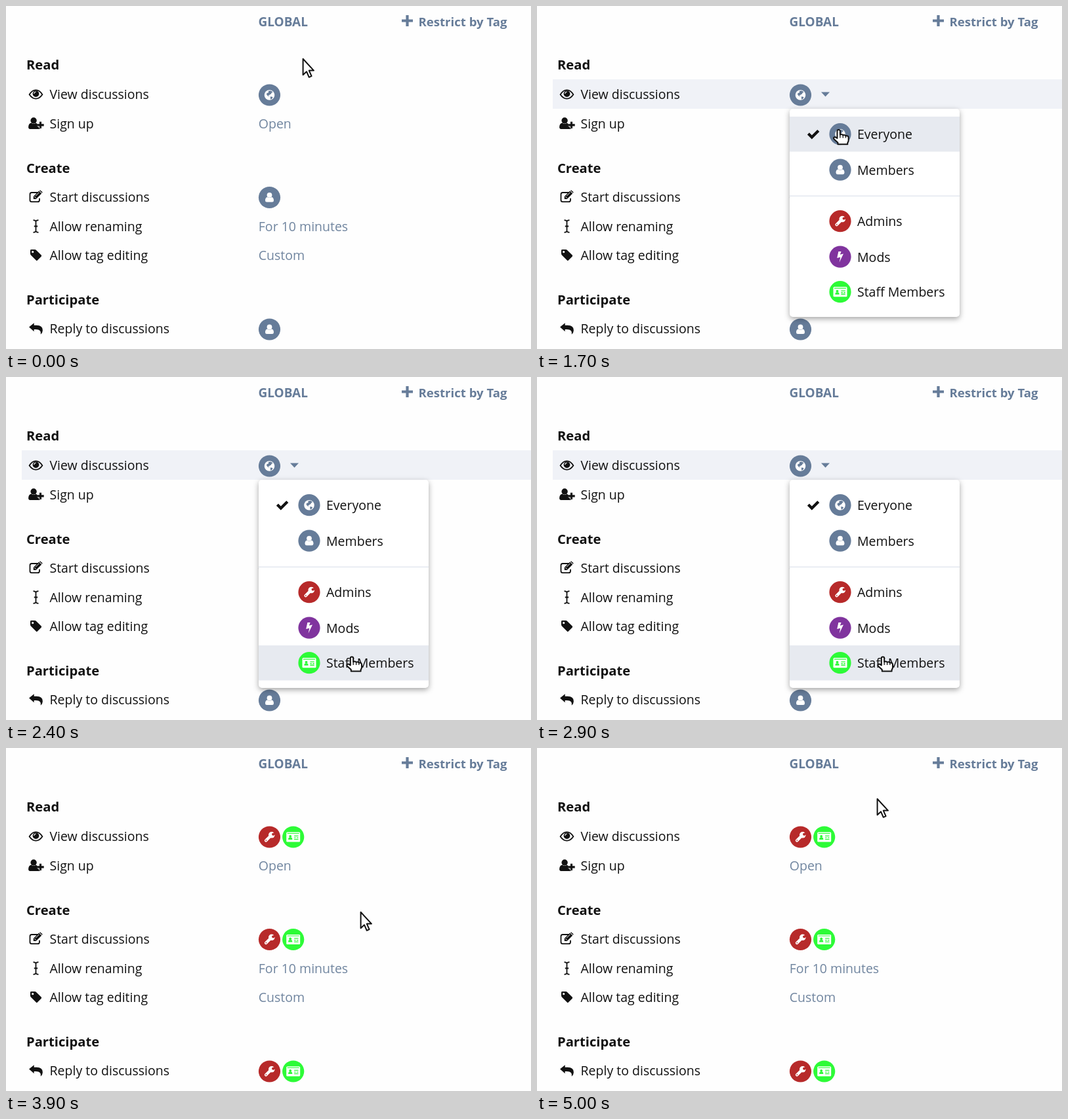
These frames come from a looping animation (800x524 px, 5.1 s). An HTML page:

```html
<!DOCTYPE html>
<html lang="en">
<head>
<meta charset="utf-8">
<title>Permissions</title>
<style>
  html, body { margin: 0; width: 100%; height: 100%; overflow: hidden; background: #fefefe; }
  svg { display: block; width: 800px; height: 524px; }
  text { font: 19.5px "Open Sans", sans-serif; fill: #111; }
  .bold { font-weight: 700; }
  .muted { fill: #667c99; }
  .value { fill: #70859f; }
  .menu { fill: #fff; filter: drop-shadow(0 3px 4.5px rgba(0, 0, 0, .35)); }
  .line { fill: none; stroke: #111; }
</style>
</head>
<body>
<svg viewBox="0 0 800 524">
  <defs>
    <!-- Badge glyphs: white, with details in the badge colour (currentColor) -->
    <g id="globe">
      <circle r="7.8" fill="#fff"/>
      <path fill="currentColor" d="M-1.6-6.2 2.2-6.6 5.2-4.6 3.2-3.4 2.4-1.6.4-.8-.6.8-2.2.2-1.4 2 .4 2.4-1 2.6-3.2 1-4.6-1.6-3.6-3-1.4-3.8zM1.2 2.4 3.6 2.6 5.2 3.8 3.4 6 1.6 6.8z"/>
    </g>
    <g id="user" fill="#fff">
      <circle cy="-3.6" r="3.9"/>
      <path d="M-3.4-.6Q0 1.8 3.4-.6C5.6-.4 6.5 2 6.5 4.4Q6.5 7 4.2 7H-4.2Q-6.5 7-6.5 4.4C-6.5 2-5.6-.4-3.4-.6z"/>
    </g>
    <g id="wrench">
      <path d="M-5.4 5.4 2-2" stroke="#fff" stroke-width="4.5" stroke-linecap="round"/>
      <circle cx="3.3" cy="-3.2" r="4.8" fill="#fff"/>
      <path fill="currentColor" d="M9-7.2 3.7-5.4V-2.9L5.9-1.9 10-4.4zM-4.3 5.1a.9.9 0 1 1-1.8 0 .9.9 0 0 1 1.8 0"/>
    </g>
    <path id="bolt" fill="#fff" d="M-2.6-8.2H1.6L-.2-3.5 5-4.7-1.4 8.6.3.5-4.8 1.7z"/>
    <g id="card">
      <rect x="-10.5" y="-7.6" width="21" height="15.2" rx="1.6" fill="#fff"/>
      <path fill="currentColor" d="M-9-6.1H9V-4.9H-9zM-7.6 4Q-7.6.9-5.9.8H-3.1Q-1.4.9-1.4 4zM1.4-2.2H7.8V-.9H1.4zM1.4.4H4V1.7H1.4zM5.2.4H7.8V1.7H5.2zM1.4 2.9H7.8V4.2H1.4z"/>
      <circle cx="-4.5" cy="-1" r="2" fill="currentColor"/>
    </g>

    <!-- Row icons -->
    <g id="eye">
      <path class="line" stroke-width="1.8" d="M-9.9.3Q-5.6-6.6 0-6.6T9.9.3Q5.6 6.7 0 6.7T-9.9.3z"/>
      <circle cy="-.9" r="4.9" fill="#111"/>
      <path d="M-2.8-1Q-2.7-3.6 0-3.8" fill="none" stroke="#fff" stroke-width="1.1"/>
    </g>
    <g id="join" fill="#111">
      <circle cx="-3.4" cy="-4.5" r="4.7"/>
      <path d="M-7-1Q-3.4 2.2.2-1L3.2 1.4V5H6V8.4H-9Q-11.4 8.4-11.4 5.6-11.2-.4-7-1z"/>
      <path d="M7-2.4V7.2M2.2 2.4H11.8" stroke="#fefefe" stroke-width="4.8"/>
      <path d="M7-2.8V7.6M1.8 2.4H12.2" stroke="#111" stroke-width="3.1"/>
    </g>
    <g id="edit">
      <path class="line" stroke-width="1.8" d="M3.4-6.5H-6.3Q-9-6.5-9-3.8V5Q-9 7.7-6.3 7.7H2.8Q5.5 7.7 5.5 5V2.2"/>
      <path fill="#111" d="M-3.7 3.4V-.6L4.7-9 8.7-5 .3 3.4zM5.5-9.6 6.6-10.3 10.2-6.9 9.4-5.8z"/>
      <path d="M-2.2-.4.2 2M-.3-1.4 4.9-6.6" stroke="#fefefe" stroke-width="1"/>
    </g>
    <path id="rename" class="line" stroke-width="1.8" d="M-4-9.3Q0-9.3 0-6.8V6.8Q0 9.3-4 9.3M4-9.3Q0-9.3 0-6.8M0 6.8Q0 9.3 4 9.3M-2.7 0H2.7"/>
    <path id="tag" fill="#111" fill-rule="evenodd" d="M-8.5-7Q-8.5-8.4-7-8.4H-1.6Q-.4-8.4.8-7.3L8.2.1Q9.2 1.1 8.2 2.2L2.4 8Q1.3 9 .3 8L-7.2.5Q-8.5-.8-8.5-2zM-3.2-4.8a1.6 1.6 0 1 0-3.2 0 1.6 1.6 0 0 0 3.2 0"/>
    <path id="reply" fill="#111" d="M-10.4-2.4-2.8-8.7V-5.2H1Q10.4-5.2 10.4 2.4 10.4 6 7.4 8.8 9 1-.2.9H-2.8V4.3z"/>

    <!-- Pointers, hot spot at 0,0 -->
    <path id="arrow" fill="#fff" stroke="#111" stroke-width="2" stroke-linejoin="round" d="M.6.8V25.2L6 20.2 9.8 28.8 13.6 27.2 9.8 18.6H17z"/>
    <g id="hand" stroke="#111" stroke-width="2" stroke-linejoin="round" stroke-linecap="round">
      <path fill="#fff" d="M-.2 13.4V2.4Q-.2.4 2 .4T4.2 2.4V8Q6.8 6.6 8.6 8.6 11.2 7.6 12.8 9.6 16.8 8.8 17 12.6V16.6Q17 18.8 15.6 20.2V22.6H.8V20L-5 14.8Q-6.4 12.8-4.6 11.8-2.8 11-.2 13.4z"/>
      <path fill="none" stroke-width="1.3" d="M4.2 8V12.4M8.6 8.6V12.4M12.8 9.6V12.4"/>
    </g>
  </defs>
  <g id="scene"></g>
</svg>
<script>
const LOOP = 5100, STEP = 100, OPEN_AT = 1300, PICK_AT = 3200;

const badges = {
  globe: "#667c99", user: "#667c99", wrench: "#b72a2a", bolt: "#80349e", card: "#2dfb37"
};
// Row: centre y, icon, label, then either a badge or a text value with its right edge
const rows = [
  { y: 135, icon: "eye", label: "View discussions", badge: "globe" },
  { y: 179.5, icon: "join", label: "Sign up", value: "Open", end: 434 },
  { y: 291.5, icon: "edit", label: "Start discussions", badge: "user" },
  { y: 336.5, icon: "rename", label: "Allow renaming", value: "For 10 minutes", end: 520 },
  { y: 380.5, icon: "tag", label: "Allow tag editing", value: "Custom", end: 456 },
  { y: 493, icon: "reply", label: "Reply to discussions", badge: "user" }
];
const headings = [["Read", 90], ["Create", 247.5], ["Participate", 449]];
const choices = [
  ["globe", "Everyone", 196], ["user", "Members", 250.5], ["wrench", "Admins", 329],
  ["bolt", "Mods", 383.5], ["card", "Staff Members", 437]
];
// Pointer path: time, x, y
const path = [
  [0, 452, 80], [600, 452, 80], [900, 433, 138], [1500, 433, 138], [2100, 507, 290],
  [2400, 525, 427], [3600, 525, 427], [3900, 540, 250], [4200, 518, 93],
  [4400, 518, 91], [4800, 518, 77], [LOOP, 518, 77]
];

const use = (id, x, y) => `<use href="#${id}" x="${x}" y="${y}"/>`;
const text = (x, y, label, cls = "", size = 19.5) =>
  `<text x="${x}" y="${y + 7}" class="${cls}" style="font-size:${size}px">${label}</text>`;
const rect = (x, y, w, h, fill) =>
  `<rect x="${x}" y="${y}" width="${w}" height="${h}" fill="${fill}"/>`;
const badge = (id, x, y) =>
  `<g color="${badges[id]}"><circle cx="${x}" cy="${y}" r="16.6" fill="currentColor"/>${use(id, x, y)}</g>`;

function pointerAt(t) {
  const i = path.findIndex(p => p[0] > t);
  const [t0, x0, y0] = path[i - 1], [t1, x1, y1] = path[i];
  const k = (t - t0) / (t1 - t0);
  return [x0 + (x1 - x0) * k, y0 + (y1 - y0) * k];
}

function drawRow(row, hovered, picked) {
  let out = hovered ? rect(24, row.y - 23, 776, 45, "#f0f2f7") : "";
  out += use(row.icon, 45.5, row.y) + text(66.5, row.y, row.label);
  let end = row.end;
  if (row.value) {
    out += text(384.8, row.y, row.value, "value");
  } else {
    const ids = picked ? ["wrench", "card"] : [row.badge];
    ids.forEach((id, i) => out += badge(id, 401.5 + 36.2 * i, row.y + 1));
    end = 382 + 36 * ids.length;
  }
  if (hovered) out += `<path class="muted" d="M${end + 15} ${row.y - 3.5}h13l-6.5 7z"/>`;
  return out;
}

function drawMenu(hovered) {
  let out = '<rect class="menu" x="385" y="157" width="259" height="318" rx="5"/>' +
    rect(385, 289.5, 259, 1.5, "#e3e8ef");
  for (const choice of choices) {
    const [id, label, y] = choice;
    if (choice === hovered) out += rect(385, y - 27, 259, 53.5, "#e7eaf0");
    out += badge(id, 462, y - .3) + text(488, y, label);
  }
  return out + '<path class="line" stroke-width="4.3" d="M413.4 195 418.8 200.4 428.8 190.4"/>';
}

function draw(t) {
  const open = t >= OPEN_AT && t < PICK_AT, picked = t >= PICK_AT;
  const [x, y] = pointerAt(t);
  const over = centre => y >= centre - 23 && y < centre + 22;
  const hoveredRow = open ? rows[0] : rows.find(row => over(row.y));
  const hoveredChoice = open && choices.find(c => y >= c[2] - 27 && y < c[2] + 27);
  const onButton = open ? hoveredChoice || over(rows[0].y) : hoveredRow;

  let out = text(384.5, 23.5, "GLOBAL", "bold muted", 19) +
    text(628.5, 23.5, "Restrict by Tag", "bold muted", 18.6) +
    '<path d="M611.5 14V31M603 22.5H620" stroke="#667c99" stroke-width="4.2"/>';
  for (const [label, cy] of headings) out += text(31, cy, label, "bold", 20.2);
  for (const row of rows) out += drawRow(row, row === hoveredRow, picked);
  if (open) out += drawMenu(hoveredChoice);
  out += use(onButton ? "hand" : "arrow", x, y);
  scene.innerHTML = out;
}

const scene = document.getElementById("scene");
let shown = -1;
function tick() {
  const t = Math.floor(performance.now() % LOOP / STEP) * STEP;
  if (t !== shown) draw(shown = t);
  requestAnimationFrame(tick);
}
tick();
</script>
</body>
</html>
```
